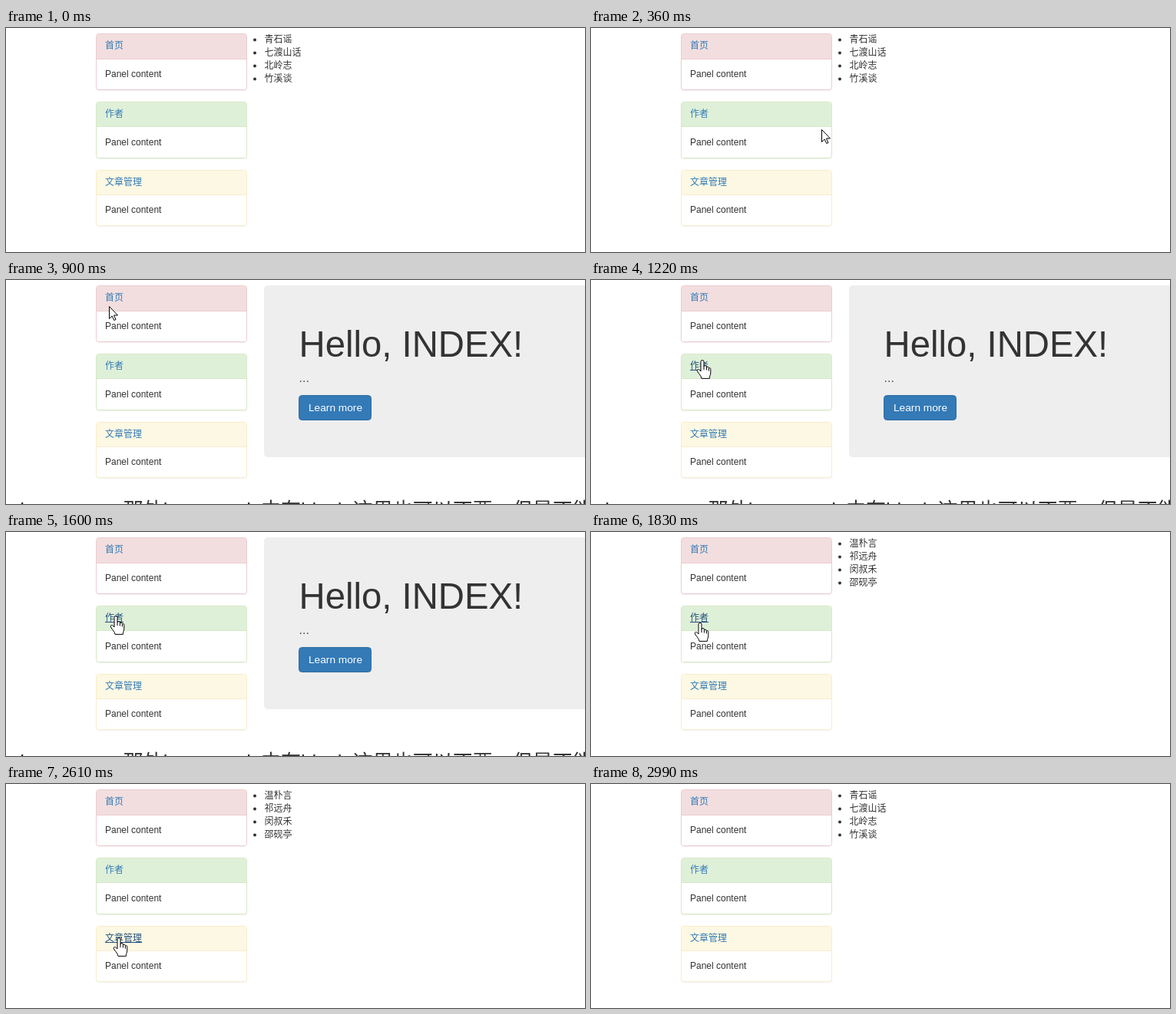
These frames come from a looping animation (754 px wide and 292 px high, 4.41 s). An HTML page:

```html
<!DOCTYPE html>
<html lang="zh">
<head>
<meta charset="utf-8">
<style>
html, body { margin: 0; width: 100%; height: 100%; overflow: hidden; background: #fff; }
svg { display: block; width: 754px; height: 292px; }
text { font-family: "Liberation Sans", Arial, "Noto Sans CJK SC", "Noto Sans CJK", sans-serif; fill: #333; white-space: pre; }
</style>
</head>
<body>
<svg id="stage" viewBox="0 0 754 292"></svg>
<script>
const LOOP = 4410;
const TICK = 73; // the pointer moves in steps of this many ms
const stage = document.getElementById('stage');

function add(parent, tag, attrs = {}, content) {
  const el = document.createElementNS('http://www.w3.org/2000/svg', tag);
  for (const k in attrs) el.setAttribute(k, attrs[k]);
  if (content) el.textContent = content;
  parent.append(el);
  return el;
}
const label = (parent, x, y, size, s) => add(parent, 'text', { x, y, 'font-size': size }, s);
const show = (el, on) => el.setAttribute('visibility', on ? 'visible' : 'hidden');

function panel(title, fill, border, i) {
  const top = 7 + 89 * i;
  const bottom = Math.round(81 + 88.5 * i);
  const split = Math.floor(40 + 88.5 * i);
  const box = { x: 117.5, width: 196, height: bottom - top - 1, rx: 3 };
  add(stage, 'rect', { ...box, y: top + 1.5, fill: 'none', stroke: '#000', 'stroke-opacity': .05 });
  add(stage, 'rect', { ...box, y: top + .5, fill: '#fff', stroke: border });
  add(stage, 'path', { d: `M118 ${split}V${top + 3}q0-2 2-2H311q2 0 2 2V${split}Z`, fill });
  add(stage, 'path', { d: `M118 ${split + .5}H313`, stroke: border });
  label(stage, 129, Math.round(64 + 88.5 * i), 12, 'Panel content');

  const y = top + 20;
  const width = 12 * title.length;
  const text = label(stage, 129, y, 12, title);
  const underline = add(stage, 'path', { d: `M129 ${y + 1.5}h${width}`, stroke: '#23527c' });
  return { y, width, text, underline };
}

function list(items) {
  const g = add(stage, 'g');
  items.forEach((s, i) => {
    add(g, 'circle', { cx: 324, cy: 15.5 + 17 * i, r: 2, fill: '#333' });
    label(g, 336.5, 19 + 17 * i, 12, s);
  });
  return g;
}

function hero() {
  const g = add(stage, 'g');
  add(g, 'rect', { x: 336, y: 7, width: 440, height: 224, rx: 5, fill: '#eee' });
  label(g, 381.5, 100, 47.3, 'Hello, INDEX!');
  label(g, 381.5, 133, 16, '...').style.fill = '#555';
  add(g, 'rect', { x: 381.5, y: 150.5, width: 94, height: 32, rx: 4, fill: '#337ab7', stroke: '#2e6da4' });
  label(g, 394, 171, 13.7, 'Learn more').style.fill = '#fff';
  label(g, -25, 309, 26, 'the bootstrap，那外bootstrapjs中有block 这里也可以不要，但是不能');
  return g;
}

const links = [
  ['首页', '#f2dede', '#ebccd1'],
  ['作者', '#dff0d8', '#d6e9c6'],
  ['文章管理', '#fcf8e3', '#faebcc']
].map((p, i) => panel(...p, i));
const books = list(['青石谣', '七渡山话', '北岭志', '竹溪谈']);
const authors = list(['温朴言', '祁远舟', '闵叔禾', '邵砚亭']);
const jumbo = hero();

const outline = { fill: '#fff', stroke: '#000', 'stroke-linejoin': 'round' };
const arrow = add(stage, 'path', { ...outline, d: 'M.5 .5V16.5L4.2 13L6.7 18.5L9 17.5L6.5 12H11.5Z' });
const hand = add(stage, 'path', { ...outline,
  d: 'M-2 15V2.5a2 2 0 0 1 4 0V9a1.7 1.7 0 0 1 3.4 .4V10a1.6 1.6 0 0 1 3 .6V11.5a1.3 1.3 0 0 1 2.4 1V17' +
     'c0 3-1.5 4-1.5 7.4H-1C-1 21-6.8 16-6.8 14c0-2 2.6-2.3 4.8 1ZM2 9v4M5.4 10v3.5M8.4 11.5v3' });

// Pointer glides: start time, steps, from, to
const glides = [
  [70, 6, [463, 248], [136, 16]],
  [900, 5, [134, 34], [146, 112]],
  [1520, 1, [146, 110], [143, 109]],
  [1830, 6, [142, 118], [144, 188]],
  [2380, 1, [146, 195], [147, 198]],
  [2610, 1, [147, 200], [147, 201]]
];

function pointer(t) {
  const glide = glides.findLast(g => g[0] <= t);
  if (!glide || t >= 2990) return null;
  const [start, steps, from, to] = glide;
  const p = Math.min(1, Math.floor((t - start) / TICK) / steps);
  const ease = p * p * (3 - 2 * p);
  return from.map((a, i) => Math.round(a + (to[i] - a) * ease));
}

function draw(t) {
  const page = t < 900 || t >= 2910 ? books : t < 1830 ? jumbo : authors;
  for (const p of [books, jumbo, authors]) show(p, p === page);

  const pos = pointer(t);
  const [x, y] = pos || [-99, -99];
  let over = false;
  for (const link of links) {
    const hit = x >= 129 && x < 129 + link.width && y >= link.y - 12 && y < link.y + 3;
    link.text.style.fill = hit ? '#23527c' : '#337ab7';
    show(link.underline, hit);
    over ||= hit;
  }
  for (const c of [arrow, hand]) c.setAttribute('transform', `translate(${x} ${y})`);
  show(arrow, pos && !over);
  show(hand, pos && over);
}

const start = performance.now();
function tick() {
  draw((performance.now() - start) % LOOP);
  requestAnimationFrame(tick);
}
tick();
</script>
</body>
</html>
```
